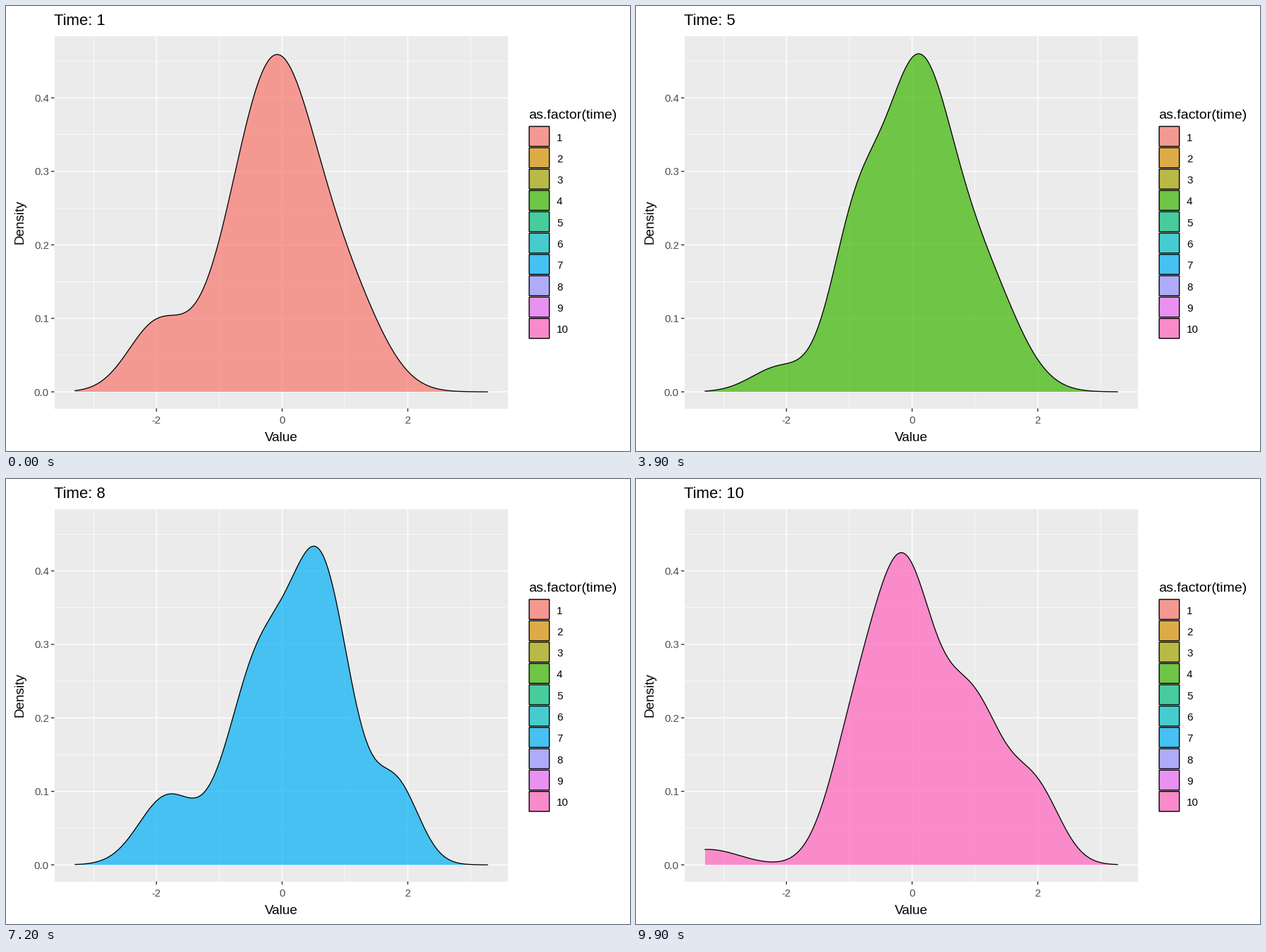
A matplotlib script that plays this animation: 885 px wide and 632 px high, repeating every 10000 ms.

```python
import numpy as np
import matplotlib.pyplot as plt
from matplotlib.animation import FuncAnimation
from matplotlib.patches import Rectangle

W, H, DPI = 885, 632, 120
LEFT, RIGHT, TOP, BOTTOM = 68.5, 712, 43, 571.5
BASE, UNIT_Y = 548, 1043.75
ZERO, UNIT_X = 391.6, 89.1
PX = 72 / DPI  # one pixel in points
COLORS = ["#F8766D", "#D89000", "#A3A500", "#39B600", "#00BF7D",
          "#00BFC4", "#00B0F6", "#9590FF", "#E76BF3", "#FF62BC"]

plt.rcParams["font.family"] = "Liberation Sans"
plt.rcParams["axes.unicode_minus"] = False


def px(v):
    return ZERO + UNIT_X * v


def py(d):
    return BASE - UNIT_Y * d


VALUES = np.linspace(-3.295, 3.27, 400)
XS = px(VALUES)


def bumps(*parts):
    """Density as a sum of bell curves given as (height, centre, spread)."""
    return py(sum(h * np.exp(-((VALUES - m) / s)**2 / 2) for h, m, s in parts))


curves = [
    bumps((.455, -.1, .7), (.08, 1.18, .52), (.088, -2, .46)),
    bumps((.385, -.1, .8), (.09, 1.4, .7)),
    bumps((.286, -.2, .57), (.25, .9, .65), (.135, -1.25, .57)),
    bumps((.43, .08, .55), (.19, -.92, .4), (.142, 1.15, .55), (.034, -2.1, .45)),
    bumps((.46, .05, .76), (.05, -1.8, .5)),
    bumps((.345, -.6, .75), (.252, .9, .46), (.037, 2, .4), (.008, -2.8, .4)),
    bumps((.39, .62, .477), (.262, -.38, .5), (.105, 1.82, .36), (.092, -1.83, .45)),
    bumps((.36, -.1, .85), (.09, 1.2, .65)),
    bumps((.364, -.49, .53), (.313, .568, .52), (.064, 1.97, .41), (.042, -1.95, .62)),
    bumps((.37, -.13, .46), (.22, .95, .5), (.162, -.9, .43), (.094, 1.98, .39),
          (.021, -3.25, .5)),
]

fig = plt.figure(figsize=(W / DPI, H / DPI), dpi=DPI, facecolor="white")
ax = fig.add_axes([0, 0, 1, 1])
ax.set_xlim(0, W)
ax.set_ylim(H, 0)
ax.axis("off")


def seg(x0, y0, x1, y1, color="white", width=1.4):
    ax.plot([x0, x1], [y0, y1], color=color, lw=width * PX, zorder=1,
            solid_capstyle="butt", snap=False)


def label(x, y, s, size, color="black", ha="left", **kw):
    return ax.text(x, y, s, fontsize=size, color=color, ha=ha, va="baseline", **kw)


# Panel and grid
ax.add_patch(Rectangle((LEFT, TOP), RIGHT - LEFT, BOTTOM - TOP, fc="#EBEBEB", lw=0, zorder=0))
for v in range(-3, 4, 2):
    seg(px(v), TOP, px(v), BOTTOM, width=.7)
for d in np.arange(.05, .5, .1):
    seg(LEFT, py(d), RIGHT, py(d), width=.7)
for v in (-2, 0, 2):
    seg(px(v), TOP, px(v), BOTTOM)
    seg(px(v), BOTTOM, px(v), BOTTOM + 4.5, "#333333")
    label(px(v), 593, str(v), 9, "#4D4D4D", "center")
for d in np.arange(5) / 10:
    seg(LEFT, py(d), RIGHT, py(d))
    seg(LEFT - 4.5, py(d), LEFT, py(d), "#333333")
    label(61, py(d) + 5.5, f"{d:.1f}", 9, "#4D4D4D", "right")

label(390.5, 618, "Value", 11.4, ha="center")
label(24.5, 307, "Density", 11.4, ha="center", rotation=90, rotation_mode="anchor")
title = label(68.5, 27, "", 13.3)

# Legend
label(741, 159.5, "as.factor(time)", 11.7)
for i, c in enumerate(COLORS):
    y = 185.2 + 30.3 * i
    box = (742, y - 14.2), 28.6, 28.4
    ax.add_patch(Rectangle(*box, fc="#EBEBEB", lw=0, zorder=1))
    ax.add_patch(Rectangle(*box, fc=c, alpha=.7, lw=0, zorder=2))
    ax.add_patch(Rectangle(*box, fill=False, ec="black", lw=1.4 * PX, zorder=3, snap=False))
    label(781, y + 6.3, str(i + 1), 9)

area, = ax.fill([0, 1, 1], [0, 0, 1], alpha=.7, lw=0, zorder=4)
line, = ax.plot([], [], color="black", lw=1.3 * PX, zorder=5)


def update(f):
    # The title rounds to the nearest state while the curve holds until the next.
    k = f // 11
    title.set_text(f"Time: {(f + 5) // 11 + 1}")
    ys = curves[k]
    area.set_xy(np.column_stack([np.r_[XS, XS[-1], XS[0]], np.r_[ys, BASE, BASE]]))
    area.set_facecolor(COLORS[k])
    line.set_data(XS, ys)
    return title, area, line


anim = FuncAnimation(fig, update, frames=100, interval=100, repeat=True, repeat_delay=0,
                     init_func=lambda: update(0))
plt.show()
```
